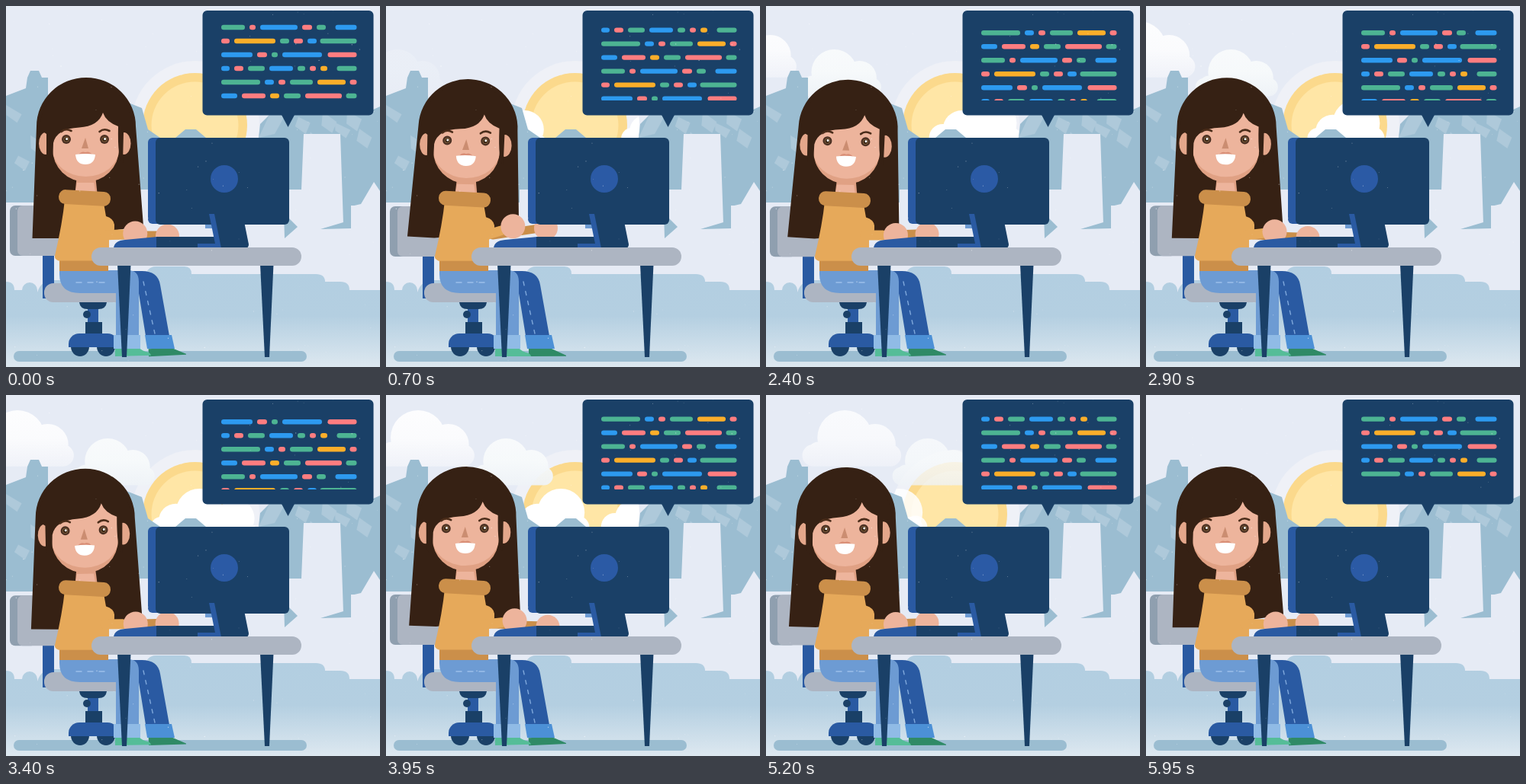
Recreate the animation shown at these times as an HTML page with a canvas. Size 490 by 474 pixels, loop 6 s.

```html
<!DOCTYPE html>
<html lang="en">
<head>
<meta charset="utf-8">
<title>Coding at a desk</title>
<style>
html,body{margin:0;width:100%;height:100%;overflow:hidden;background:#e6ebf5}
canvas{display:block;width:490px;height:474px}
</style>
</head>
<body>
<canvas id="stage" width="490" height="474"></canvas>
<script>
const g = document.getElementById('stage').getContext('2d');
const LOOP = 6000, STEP = 50, TAU = Math.PI * 2;
const SKY = '#e6ebf5', NAVY = '#1a4067', BLUE = '#2a5aa2', GREY = '#adb5c2',
  HAIR = '#362114', SKIN = '#edb49c', SHADE = '#e0a184', COAT = '#e6a95a', KNIT = '#cb8f4a',
  ROCK = '#9bbdd1', PALE = '#aec9da', JEANS = '#6d9bd3';

function fill(c) { g.fillStyle = c; g.fill(); }
function shape(c, d) { g.fillStyle = c; g.fill(new Path2D(d)); }
function box(c, x0, y0, x1, y1, r = 0) {
  g.beginPath();
  g.roundRect(x0, y0, x1 - x0, y1 - y0, r);
  fill(c);
}
function oval(c, x, y, rx, ry = rx) {
  g.beginPath();
  g.ellipse(x, y, rx, ry, 0, 0, TAU);
  fill(c);
}
function line(c, w, d, dash = []) {
  g.strokeStyle = c;
  g.lineWidth = w;
  g.lineCap = 'round';
  g.setLineDash(dash);
  g.stroke(new Path2D(d));
}
function group(draw) { g.save(); draw(); g.restore(); }
function turn(a, x, y) { g.translate(x, y); g.rotate(a); g.translate(-x, -y); }
function fade(top, bottom, ...colors) {
  const f = g.createLinearGradient(0, top, 0, bottom);
  colors.forEach((c, i) => f.addColorStop(i / (colors.length - 1), c));
  return f;
}
function random(seed) {
  return () => (seed = seed * 16807 % 2147483647) / 2147483647;
}
const ramp = (t, a, b) => Math.min(1, Math.max(0, (t - a) / (b - a)));
const wave = (t, period) => Math.sin(TAU * t / period);
const swing = (t, period) => (1 - Math.cos(TAU * t / period)) / 2;

// A main puff of radius r with a smaller one on each side, on a rounded bar.
function cloud(c, x, base, r) {
  g.beginPath();
  for (const [dx, up, size] of [[0, 1, 1], [1.1, .75, .75], [-.95, .4, .45]]) {
    const cx = x + dx * r, cy = base - up * r;
    g.moveTo(cx + size * r, cy);
    g.arc(cx, cy, size * r, 0, TAU);
  }
  g.roundRect(x - r * 1.55, base - r * .75, r * 3.6, r * .8, r * .4);
  fill(c);
}

// Low clouds, seen only in front of the sun's halo; side is -1 or 1.
function bank(x, r, side, reach) {
  oval('#fff', x, 154, r);
  oval('#fff', x - r, 165, r * .72);
  oval('#fff', x + r * .7, 174, r * .5);
  box('#fff', x - reach, 160, x + r, 192, 14);
}

function sky(t) {
  box(SKY, 0, 0, 490, 474);
  oval('#eff1f7', 248, 156, 84);
  oval('#fbd98c', 247.5, 156.5, 68.5);
  oval('#ffe6a6', 247.5, 156.5, 57);

  const out = 1 - ramp(t, 5.1, 5.75);
  group(() => {
    g.beginPath();
    g.arc(248, 156, 84, 0, TAU);
    g.clip();
    g.globalAlpha = ramp(t, 0, .6) * out;
    group(() => { g.translate(0, 8); bank(217 + 44 * (t - 1.5), 25, 1, 40); });
    bank(205 - 44 * (t - 4.5), 31, -1, 64);
  });
  group(() => {
    g.globalAlpha = .95 * ramp(t, .3, 2) * out;
    cloud(fade(57, 118, '#f9fbfc', '#f7fafb', '#eff3f7'), 50 + 43.8 * (t - 1.5), 117, 30);
    g.globalAlpha = .9 * out;
    cloud(fade(20, 93, '#fff', '#fdfdfe', '#f1f3f9'), 69 + 49 * (t - 4.5), 92, 36);
  });
}

const range = 'M0 118L26 108L28 94L32 85H43L47 94H55V122L92 100L178 134L186 162L202 173H222L235 162H249L262 173' +
  'H331L333 155L345 143L430 120L481 136L490 132V262H452V292H412L388 241H175V258H0Z';

function land() {
  shape(ROCK, range);
  group(() => {
    g.clip(new Path2D(range));
    const rnd = random(5);
    for (let i = 0; i < 9; i++) {
      const x = i < 3 ? i * 16 : 335 + i * 16, y = 130 + rnd() * 100;
      shape(PALE, `M${x} ${y}l${14 + rnd() * 10} ${6 + rnd() * 8}l-6 ${8 + rnd() * 10}l-14 -10Z`);
    }
    shape(PALE, 'M331 173L345 143H366L352 168Z');
  });
  shape(SKY, 'M390 168H438L442 286L412 293H384L387 241Z');
  shape(ROCK, 'M412 293L442 284L452 292ZM364 272L382 290L365 305Z');
  shape(SKY, 'M452 263L465 260L482 231L490 243V300H452Z');

  shape(fade(340, 474, '#b2cee1', '#b4cfe1', '#dde8f0'),
    'M0 362Q11 362 11 373H21A10 10 0 0 1 41 373V376Q46 360 62 360H180Q184 342 196 342H234Q243 342 243 352' +
    'H406Q418 352 418 362H438Q450 362 450 373H490V474H0Z');
  box(ROCK, 10, 453, 394, 467, 7);
}

function chair(dy) {
  box(BLUE, 48, 322, 63, 384);
  group(() => {
    g.translate(0, dy);
    box('#8f9faf', 5, 262, 40, 328, 7);
    box(GREY, 15, 262, 90, 328, 7);
  });
  box(GREY, 50, 364, 160, 389, 12);
  shape(NAVY, 'M96 389H132Q131 398 121 398H107Q97 398 96 389Z');
  box(BLUE, 107, 398, 121, 416);
  oval(NAVY, 106, 405, 5);
  box(NAVY, 104, 415, 126, 432);
  for (const x of [97, 131]) shape(NAVY, `M${x - 12} 447h24a12 13 0 0 1 -24 0Z`);
  box(BLUE, 82, 430, 147, 448, [14, 14, 0, 0]);
}

function legs(t) {
  const toe = .048 * (swing(t, .5) - 1);
  group(() => {
    turn(toe, 190, 459);
    shape('#2f8a66', 'M187 450H217L236 459V460H187Z');
  });
  shape(BLUE, 'M150 348H178Q199 348 202 366L214 433H183L172 365H150Z');
  line('#7fa8dc', 1.4, 'M180 362L195 430', [5, 8]);
  shape('#4c90d6', 'M182 432H217L221 450H185Z');
  group(() => {
    turn(toe * .6, 146, 460);
    shape('#55bd98', 'M143 449H174Q178 454 187 456Q190 458 190 460H143Z');
  });
  shape(JEANS, 'M70 347H160Q174 347 174 362V433H144V377H97Q70 377 70 352Z');
  line('#9cc0ea', 1.4, 'M92 363H134', [7, 8]);
  box('#90bbe6', 141, 432, 176, 450);
}

function hairBack(t) {
  turn(.044 * swing(t, 1.5), 104, 180);
  shape(HAIR, 'M34.5 305L40 158A65 64 0 0 1 170 158L180 289L70 305Z');
}

function eye(x) {
  oval('#4b3022', x, 175, 6);
  oval('#80603f', x, 175, 3.6);
  oval('#33200f', x, 175, 2.6);
  oval('#fff', x + .6, 174.4, 1.5);
  line('#4b2d1a', 2.6, `M${x - 6.5} 165q6 -5 13 -1`);
}

function face() {
  for (const x of [52, 154.5]) oval('#e4a78b', x, 180.5, 9, 14.5);
  for (const [c, chin] of [[SHADE, 43], [SKIN, 36]])
    shape(c, `M61 150Q61 122 104 120Q148 122 148 150V188A43.5 ${chin} 0 0 1 61 188Z`);
  shape(HAIR, 'M44 164A61 66 0 0 1 166 164Q157 162 154 166L153 206Q146 202 147 158Q131 152 127 140' +
    'Q121 158 96 159.5Q66 161 62 180L61 208Q53 208 53 196V168Q48 164 44 164Z');
  eye(79);
  eye(129);
  shape('#cb8d71', 'M104 173L108 187H99Z');
  shape('#d98f77', 'M95 195Q99 190 104 192Q109 190 113 195Z');
  shape('#fff', 'M91 195Q104 193 117 195Q116 208 104 208Q92 208 91 195Z');
}

function girl(t) {
  const bob = 3 * swing(t, 1), tilt = .023 * wave(t, 2);
  const head = draw => group(() => {
    g.translate(0, bob);
    turn(tilt, 104, 240);
    draw(t);
  });

  chair(bob * .5);
  head(hairBack);

  // The hands tap in turn and are both lifted once.
  const tap = wave(t, 6 / 17), raise = Math.exp(-(((t - .7) / .2) ** 2));
  const left = 3 + 3 * tap + 12 * raise, right = 2.5 - 2.5 * tap + 10 * raise;
  line(KNIT, 11, `M140 301L${198 - right * .2} ${303 - right * .8}`);
  oval(SKIN, 212 - right * .2, 304.5 - right, 15.5);

  legs(t);
  group(() => {
    const s = 1 - bob * .008;
    g.translate(0, 348 * (1 - s));
    g.scale(1, s);
    box(KNIT, 70, 332, 134, 348);
    shape(COAT, 'M77 254Q74 285 64 328Q63 332 69 334.5H135V306Q143 300 142 287Q141 279 131 276Q129 264 127 254Z');
  });
  line(COAT, 13, `M130 301L${153 - left * .2} ${301 - left * .4}`);
  oval(SKIN, 170 - left * .25, 301 - left * .8, 16);

  head(() => {
    shape(SHADE, 'M93 222H117L120 250H90Z');
    shape(SKIN, 'M93 232H115L118 250H90Z');
  });
  group(() => {
    g.translate(0, bob * .8);
    turn(.055, 103, 252);
    box(KNIT, 69, 242.5, 137, 261.5, 9);
  });
  head(face);
}

function desk() {
  shape(BLUE, 'M141 318Q142 308 156 307L198 303H210V318Z');
  box(NAVY, 197, 303, 276, 318);
  box(BLUE, 186, 173, 290, 286, 6);
  box(JEANS, 261, 286, 270, 292);
  shape(NAVY, 'M270 273H310L318 313Q318 318 313 318H276Z');
  box(NAVY, 196, 173, 371, 287, 6);
  shape(BLUE, 'M266 273H273L282 318H251V312H274Z');
  oval('#2b5aa5', 286, 227, 18);
  for (const x of [146, 333]) shape(NAVY, `M${x} 339h17.5l-5.5 122h-6Z`);
  box(GREY, 112, 317, 387, 341, 12);
}

// Each word is a colour and a length; the last word of a row sits flush right.
const INK = { g: '#4db493', r: '#ff7d80', b: '#2d9af0', o: '#fbae2a' };
const rows = [
  'g31 r8 b49 r13 g12 b28',
  'r11 o54 g12 r12 b12 g48',
  'b41 r13 g8 b52 r38',
  'b11 r12 g22 b31 g10 r8 o9 g26',
  'g51 b12 r9 g30 o37 r9',
  'b21 r31 o12 g22 r48 g14'
].map(row => row.split(' '));

function codeLine(words, y) {
  let x = 282;
  words.forEach((word, i) => {
    const w = +word.slice(1);
    if (i === words.length - 1) x = 459.5 - w;
    box(INK[word[0]], x, y - 3.2, x + w, y + 3.2, 3.2);
    x += w + 6;
  });
}

function bubble(t) {
  box(NAVY, 257.5, 6, 481.5, 143.5, 6);
  shape(NAVY, 'M361 143H378L369.5 159Z');
  group(() => {
    g.beginPath();
    g.rect(270, 24, 200, 100);
    g.clip();
    for (let i = 0; i < 29; i++) codeLine(rows[i % 6], 28 + 18 * i - 72 * t);
  });
}

function specks() {
  const rnd = random(11);
  for (let i = 0; i < 110; i++) {
    g.globalAlpha = .2 + rnd() * .4;
    oval('#fff', rnd() * 490, 5 + rnd() * 465, .35 + rnd() * .4);
  }
  g.globalAlpha = 1;
}

function frame(now) {
  const t = Math.floor((now % LOOP) / STEP) * STEP / 1000;
  sky(t);
  land();
  girl(t);
  desk();
  bubble(t);
  specks();
}

const start = performance.now();
function tick() {
  frame(Math.max(0, performance.now() - start));
  requestAnimationFrame(tick);
}
tick();
</script>
</body>
</html>
```
